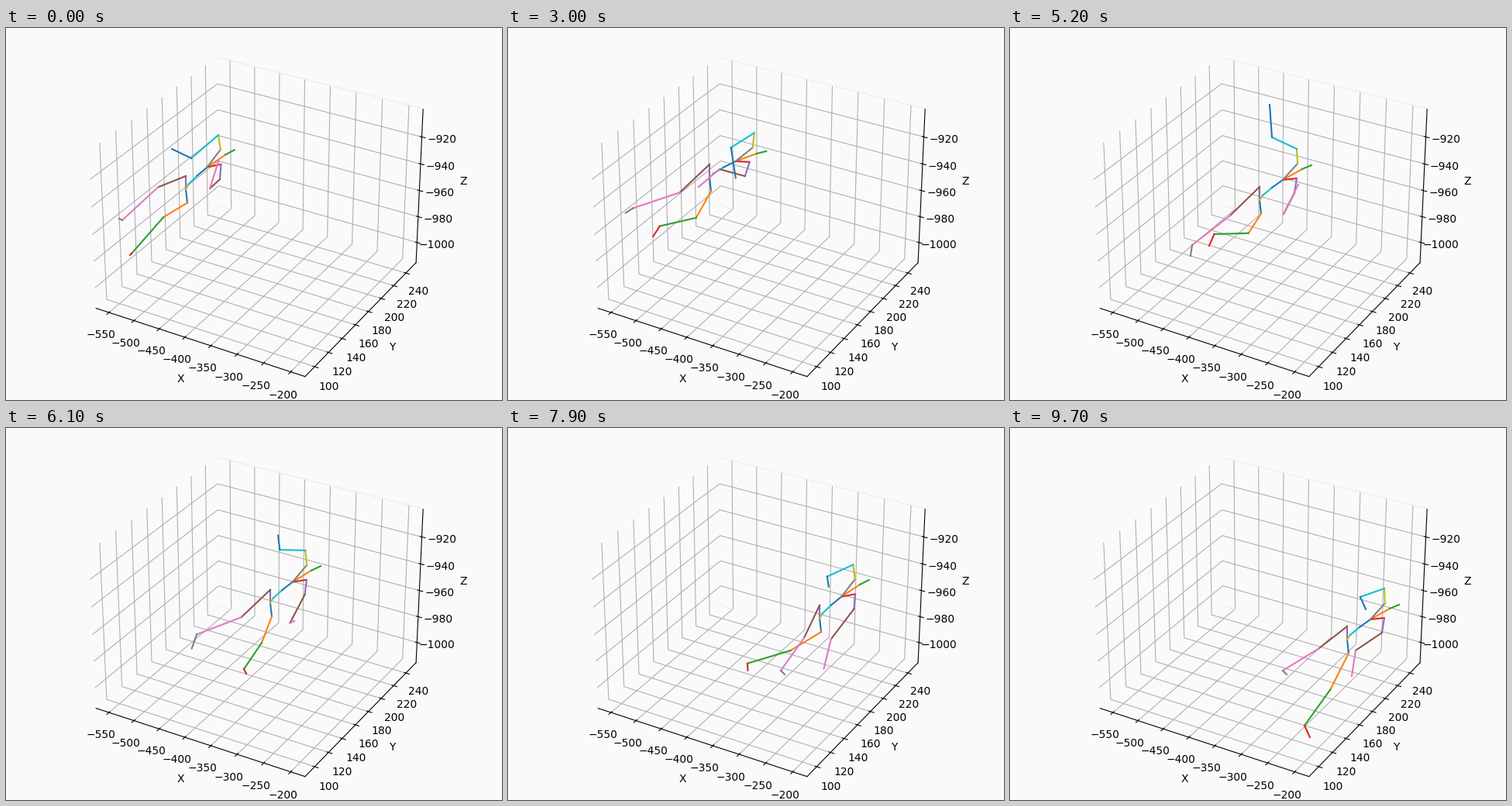
These frames come from a looping animation (640x480 px, 9800 ms). A matplotlib script:

```python
import numpy as np
import matplotlib.pyplot as plt
from matplotlib.animation import FuncAnimation

N_FRAMES = 98
BG = "#fafafa"
t = np.arange(N_FRAMES)

# Points are complex numbers x + yj in stage pixels, y downwards.

# time, pelvis x, pelvis y, forward lean in degrees
BODY = [(0, 232, 208, -5), (12, 244, 193, 0), (20, 244, 195, 4),
        (30, 260, 193, 9), (40, 270, 203, 5), (52, 322, 222, 0),
        (60, 338, 225, -2), (71, 381, 239, -4), (87, 419, 253, -4),
        (97, 435, 273, 0)]

# Rigid upper body, relative to the pelvis
LOW_BACK, MID_BACK, CHEST = 4 - 6j, 16 - 16j, 30 - 26j
NECK, HEAD = 55 - 40j, 67 - 45j
LEFT_SHOULDER = 48 - 28j, 45 - 9j
RIGHT_SHOULDER = 49 - 47j, 48 - 66j
LEFT_HIP, RIGHT_HIP = 2 + 17.5j, -17j

# Footholds: lift-off from the previous one, landing, ankle, toe offset
LEFT_STEPS = [(0, 0, 162 + 291j, -2 + 2j), (20, 38, 220 + 281j, 2 + 6j),
              (44, 60, 307 + 311j, 3 + 6j), (77, 97, 380 + 384j, 7 + 15j)]
RIGHT_STEPS = [(0, 0, 150 + 248j, -4 - 2j), (24, 50, 235 + 280j, -2 + 14j),
               (57, 78, 352 + 313j, 5 + 5j)]
FOOT_LIFT = -30j
TOE_TRAIL = -9 + 9j
KNEE_REST, KNEE_BEND, KNEE_CROUCH = 5, 9 + 12j, -14j

# time, upper arm x y, forearm x y
LEFT_ARM = [(0, -13, 12, 12, -38), (13, -28, 25, -9, 40),
            (30, -33, -9, -27, 23), (52, -14, 27, 19, -38),
            (71, -27, 42, -10, 39), (97, -34, 23, -5, 33)]
RIGHT_ARM = [(0, -35, 30, -25, -12), (12, -25, 1, 24, -7),
             (30, -30, 19, 6, 39), (52, -32, -15, -3, -42),
             (71, -34, 16, 0, 11), (97, -31, 11, 7, 16)]


def flow(keys):
    """Monotone cubic through the keys; one row per value column."""
    k = np.array(keys, float)
    kt, p = k[:, 0], k[:, 1:]
    h = np.diff(kt)[:, None]
    s = np.diff(p, axis=0) / h
    same = s[:-1] * s[1:] > 0
    total = np.where(same, s[:-1] + s[1:], 1)
    m = np.vstack([s[:1], np.where(same, 2 * s[:-1] * s[1:] / total, 0), s[-1:]])
    i = np.clip(np.searchsorted(kt, t, "right") - 1, 0, len(kt) - 2)
    d = h[i]
    u = (t[:, None] - kt[i, None]) / d
    v = 1 - u
    return ((1 + 2 * u) * v**2 * p[i] + u * v**2 * d * m[i]
            + u**2 * (1 + 2 * v) * p[i + 1] - u**2 * v * d * m[i + 1]).T


def leg(hip, steps):
    """Knee, ankle and toe of a leg that swings between footholds."""
    ankle = np.full(N_FRAMES, steps[0][2])
    toe = np.full(N_FRAMES, steps[0][3])
    swing = np.zeros(N_FRAMES)
    for off, land, spot, toe_offset in steps[1:]:
        u = np.clip((t - off) / (land - off), 0, 1)
        ease = u * u * (3 - 2 * u)
        ankle = ankle + ease * (spot - ankle)
        toe = toe + ease * (toe_offset - toe)
        swing += np.sin(np.pi * u)
    ankle = ankle + swing * FOOT_LIFT
    crouch = np.clip(1 - t / 12, 0, 1)
    knee = ((hip + ankle) / 2 + KNEE_REST + swing * KNEE_BEND
            + crouch * KNEE_CROUCH)
    return [hip, knee, ankle, ankle + toe + swing * TOE_TRAIL]


def arm(shoulder, keys):
    ux, uy, fx, fy = flow(keys)
    elbow = shoulder + ux + 1j * uy
    return [shoulder, elbow, elbow + fx + 1j * fy]


x, y, lean = flow(BODY)
pelvis = x + 1j * y


def torso(offset):
    return pelvis + offset * np.exp(1j * np.radians(lean))


chest = torso(CHEST)
limbs = [
    [pelvis] + leg(pelvis + LEFT_HIP, LEFT_STEPS),
    [pelvis] + leg(pelvis + RIGHT_HIP, RIGHT_STEPS),
    [pelvis, torso(LOW_BACK), torso(MID_BACK), chest, torso(NECK), torso(HEAD)],
    [chest, torso(LEFT_SHOULDER[0])] + arm(torso(LEFT_SHOULDER[1]), LEFT_ARM),
    [chest, torso(RIGHT_SHOULDER[0])] + arm(torso(RIGHT_SHOULDER[1]), RIGHT_ARM),
]
bones = [np.array(pair) for limb in limbs for pair in zip(limb, limb[1:])]

fig = plt.figure(figsize=(6.4, 4.8), dpi=100, facecolor=BG)

ax = fig.add_axes([0, 0, 1, 1], projection="3d", facecolor=BG)
ax.view_init(elev=30, azim=-60)
ax.set_xticks(range(-550, -199, 50))
ax.set_yticks(range(100, 241, 20))
ax.set_zticks(range(-1000, -919, 20))
ax.set(xlim=(-576.1, -173.7), ylim=(86.4, 257.0), zlim=(-1015.8, -899.6),
       xlabel="X", ylabel="Y", zlabel="Z")
for axis in (ax.xaxis, ax.yaxis, ax.zaxis):
    axis.set_pane_color((1, 1, 1, 0))

# Flat pixel layer for the moving figure
stage = fig.add_axes([0, 0, 1, 1])
stage.set(xlim=(0, 640), ylim=(480, 0))
stage.axis("off")
stage.plot([273, 538], [38, 104], color="#ececec", lw=0.8)
stage.plot([275, 290], [229, 234], color="#ececec", lw=0.8)
lines = [stage.plot([], [], color=f"C{k % 10}", lw=1.5)[0]
         for k in range(len(bones))]


def update(n):
    for line, bone in zip(lines, bones):
        line.set_data(bone[:, n].real, bone[:, n].imag)
    return lines


anim = FuncAnimation(fig, update, frames=N_FRAMES, interval=100,
                     repeat=True, repeat_delay=0, blit=False)
plt.show()
```
